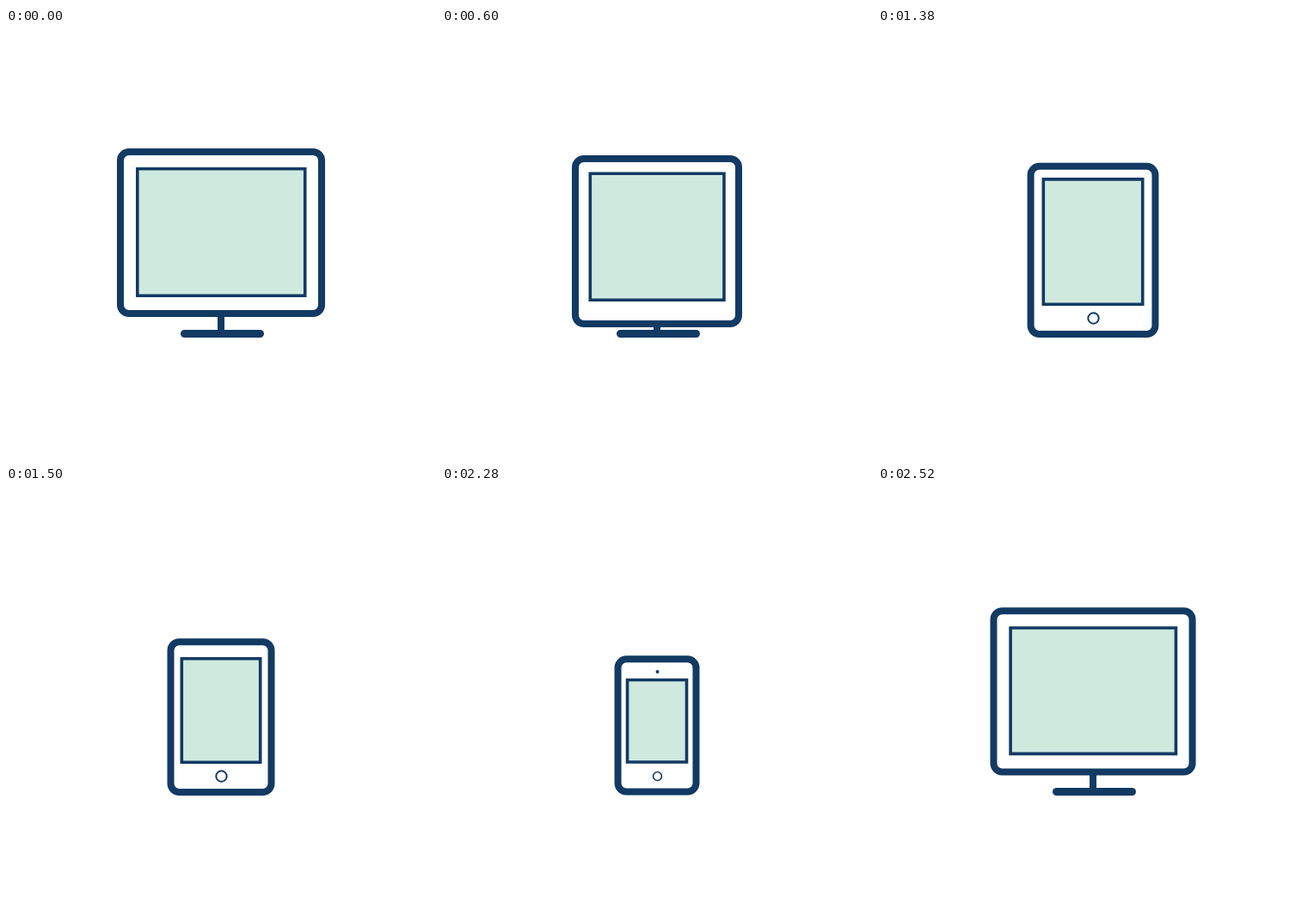
An HTML page with a canvas that plays this animation: 500x500 px, repeating every 2.55 s.

```html
<!DOCTYPE html>
<html lang="en">
<head>
<meta charset="utf-8">
<title>Responsive devices</title>
<style>
  html, body { margin: 0; width: 100%; height: 100%; overflow: hidden; background: #fff; }
  canvas { display: block; }
</style>
</head>
<body>
<canvas id="stage" width="500" height="500"></canvas>
<script>
const ctx = document.getElementById('stage').getContext('2d');
const NAVY = '#123a63', MINT = '#cfe9df';
const LOOP = 2550, STEP = 30, MORPH = 300;
const TO_TABLET = 450, TO_PHONE = 1350, TO_MONITOR = 2250;

// Outer edges: left, top, right, bottom
const monitor = { body: [129, 140, 371, 336], screen: [151, 162, 349.5, 313] };
const tablet = { body: [173, 156, 327, 360], screen: [190, 173, 310, 323] };
const phone = { body: [202, 198.5, 298, 360], screen: [215, 225, 285, 323] };

const clamp = x => Math.min(1, Math.max(0, x));
const ease = x => x < 0.5 ? 2 * x * x : 1 - 2 * (1 - x) ** 2;
const mix = (a, b, k) => a.map((v, i) => v + (b[i] - v) * k);

function frame([left, top, right, bottom], line, radius, fill) {
  const half = line / 2;
  ctx.beginPath();
  ctx.roundRect(left + half, top + half, right - left - line, bottom - top - line, radius);
  ctx.fillStyle = fill;
  ctx.fill();
  ctx.lineWidth = line;
  ctx.strokeStyle = NAVY;
  ctx.stroke();
}

function disc(y, radius) {
  ctx.beginPath();
  ctx.arc(250.5, y, radius, 0, 2 * Math.PI);
}

function stand() {
  ctx.fillStyle = NAVY;
  ctx.fillRect(246, 334, 8, 20);
  ctx.beginPath();
  ctx.roundRect(203, 351, 97, 9, 4.5);
  ctx.fill();
}

function draw(t) {
  const progress = start => clamp((t - start) / MORPH);
  const back = progress(TO_MONITOR);
  const [from, to, start] = t < TO_PHONE ? [monitor, tablet, TO_TABLET]
    : t < TO_MONITOR ? [tablet, phone, TO_PHONE]
    : [phone, monitor, TO_MONITOR];
  const k = ease(progress(start));

  // Small details grow late in a morph and shrink early on the way back
  const detail = begin => clamp(2 * progress(begin) - 1) * clamp(1 - 2 * back);
  const button = detail(TO_TABLET), camera = detail(TO_PHONE);

  ctx.fillStyle = '#fff';
  ctx.fillRect(0, 0, 500, 500);
  if (t < TO_TABLET + MORPH || back > 0.15) stand();
  frame(mix(from.body, to.body, k), 8, 10, '#fff');
  if (camera > 0) {
    disc(216, 2.5 * camera);
    ctx.fillStyle = NAVY;
    ctx.fill();
  }
  frame(mix(from.screen, to.screen, k), 3.6, 0, MINT);
  if (button > 0) {
    disc(337.5, 6.2 * button);
    ctx.lineWidth = 2 * button;
    ctx.stroke();
  }
}

const begun = performance.now();
function tick() {
  const t = (performance.now() - begun) % LOOP;
  draw(Math.floor(t / STEP) * STEP);
  requestAnimationFrame(tick);
}
tick();
</script>
</body>
</html>
```
